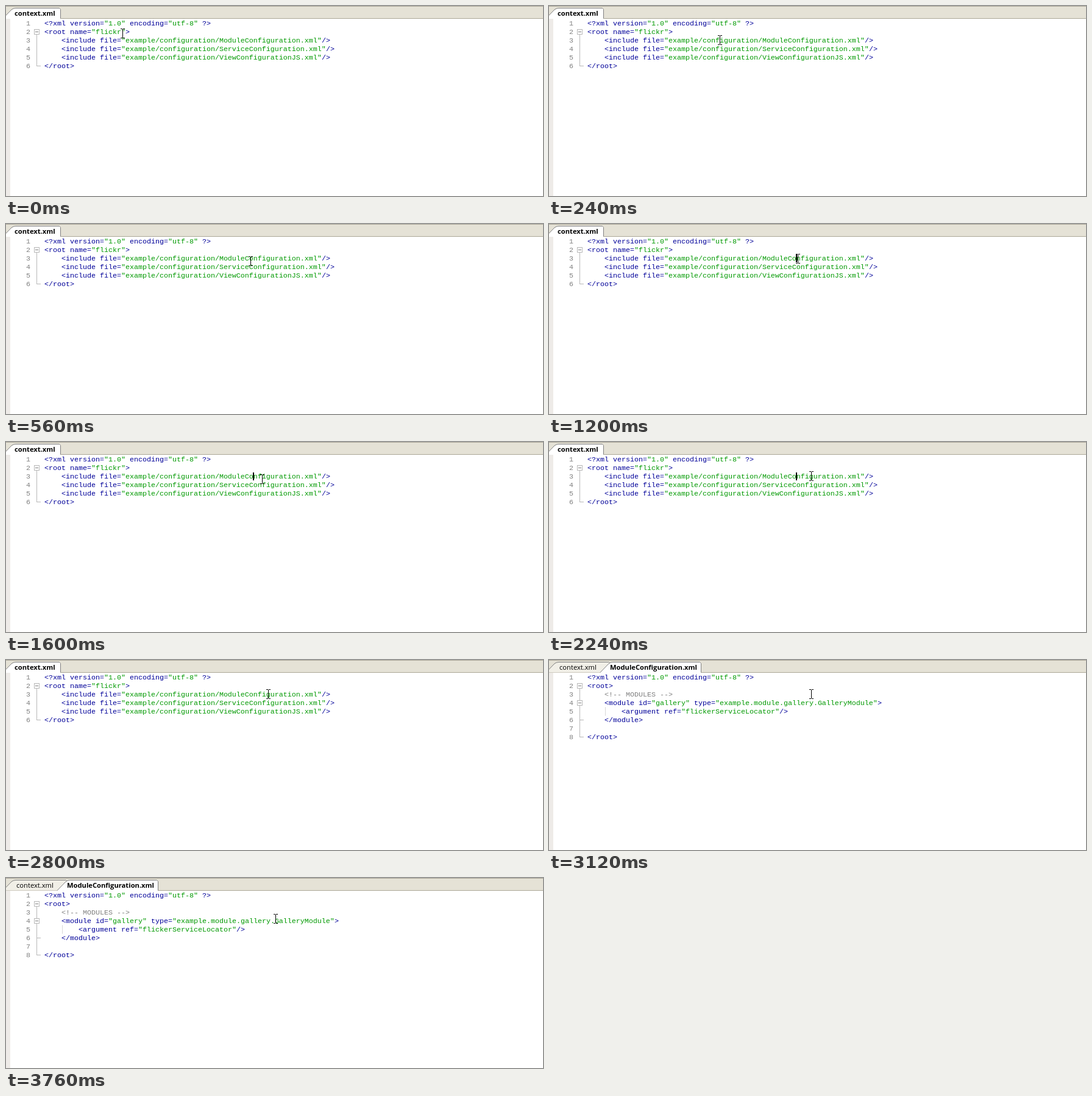
Recreate the animation shown at these times as an HTML page with a canvas. Size 881x312 px, loop 3840 ms.

```html
<!DOCTYPE html>
<html lang="en">
<head>
<meta charset="utf-8">
<title>XML editor</title>
<style>
html, body { margin: 0; overflow: hidden; }
canvas { display: block; }
</style>
</head>
<body>
<canvas width="881" height="312"></canvas>
<script>
const c = document.querySelector('canvas').getContext('2d');
const LOOP = 3840, STEP = 80, SWITCH = 3120, LINE = 14, COL = 7, LEFT = 63;
const NAVY = '#000099', GREEN = '#009900', GREY = '#808080', FOLD = '#b8b8b8', EDGE = '#aca899';
const MONO = '11.667px "Liberation Mono", monospace';

const context = [
  '<?xml version="1.0" encoding="utf-8" ?>',
  '<root name="flickr">',
  ...['ModuleConfiguration', 'ServiceConfiguration', 'ViewConfigurationJS']
    .map(n => `    <include file="example/configuration/${n}.xml"/>`),
  '</root>'
];
const modules = [
  context[0],
  '<root>',
  '    <!-- MODULES -->',
  '    <module id="gallery" type="example.module.gallery.GalleryModule">',
  '        <argument ref="flickerServiceLocator"/>',
  '    </module>',
  '',
  '</root>'
];

// Mouse pointer: time, stem x, middle y
const pointer = [
  [0, 191, 45], [80, 203, 46], [160, 236, 50], [240, 280, 56], [320, 326, 62],
  [400, 368, 67], [480, 394, 69], [560, 401, 61], [880, 408, 57], [1600, 420, 61],
  [1680, 430, 66], [1840, 431, 61], [1920, 430, 56], [3760, 442, 67]
];
// Text caret: on, off, x, y
const caret = [[1200, 1680, 405, 50], [2240, 2800, 405, 50], [3200, 3760, LEFT, 22]];

function rect(color, x, y, w, h) {
  c.fillStyle = color;
  c.fillRect(x, y, w, h);
}

function text(s, x, y, color, font, align = 'left') {
  c.fillStyle = color;
  c.font = font;
  c.textAlign = align;
  c.fillText(s, x, y);
}

function tab(label, x, right, labelX, active) {
  c.beginPath();
  c.moveTo(x, 20.5);
  c.lineTo(x + 14, 6);
  c.quadraticCurveTo(x + 17, 3.5, x + 21, 3.5);
  c.lineTo(right - 2, 3.5);
  c.lineTo(right, 5.5);
  c.lineTo(right, 20.5);
  c.fillStyle = active ? '#fff' : '#f1efe7';
  c.fill();
  c.strokeStyle = GREY;
  c.stroke();
  if (active) rect('#fff', x + 1, 20, right - x - 1.5, 1);
  const weight = active ? 'bold ' : '';
  text(label, labelX, 16, '#000', weight + '11.2px "Open Sans", "Noto Sans", sans-serif');
}

function code(lines) {
  lines.forEach((line, i) => {
    const y = 32 + i * LINE;
    text(i + 1, 40, y, GREY, MONO, 'right');
    for (const m of line.matchAll(/<!--.*?-->|"[^"]*"|[^\s"]+/g)) {
      const color = m[0].startsWith('<!--') ? GREY : m[0][0] === '"' ? GREEN : NAVY;
      text(m[0], LEFT + m.index * COL, y, color, MONO);
    }
  });
}

function folds(opens, ends) {
  const last = ends[ends.length - 1];
  rect(FOLD, 50, 47, 1, last - 46);
  for (const y of ends) rect(FOLD, 50, y, 7, 1);
  for (const y of opens) {
    rect(FOLD, 46, y - 4, 9, 9);
    rect('#fff', 47, y - 3, 7, 7);
    rect(GREY, 48, y, 5, 1);
  }
}

function beam(x, y) {
  for (const top of [y - 8, y + 7]) {
    rect('#000', x - 3, top, 3, 1);
    rect('#000', x + 1, top, 3, 1);
  }
  rect('#000', x, y - 7, 1, 14);
}

function draw(t) {
  rect('#fff', 0, 0, 881, 312);
  rect('#e5e2d6', 0, 0, 881, 20);
  rect(EDGE, 0, 0, 881, 1);
  rect(EDGE, 0, 20, 881, 1);
  rect('#eeebe8', 0, 21, 7, 291);
  if (t < SWITCH) {
    tab('context.xml', -5, 89.5, 14, true);
    folds([42], [98]);
    code(context);
  } else {
    tab('context.xml', -5, 100.5, 17, false);
    tab('ModuleConfiguration.xml', 84, 249.5, 100, true);
    folds([42, 70], [98, 126]);
    for (let y = 78; y < 92; y += 2) rect('#b0b0b0', 92, y, 1, 1);
    code(modules);
  }
  for (const [on, off, x, y] of caret) if (t >= on && t < off) rect('#000', x, y, 2, 13);
  const [, x, y] = pointer.filter(p => p[0] <= t).pop();
  beam(x, y);
}

const start = performance.now();
function frame() {
  const t = (performance.now() - start) % LOOP;
  draw(Math.floor(t / STEP) * STEP);
  requestAnimationFrame(frame);
}
frame();
</script>
</body>
</html>
```
